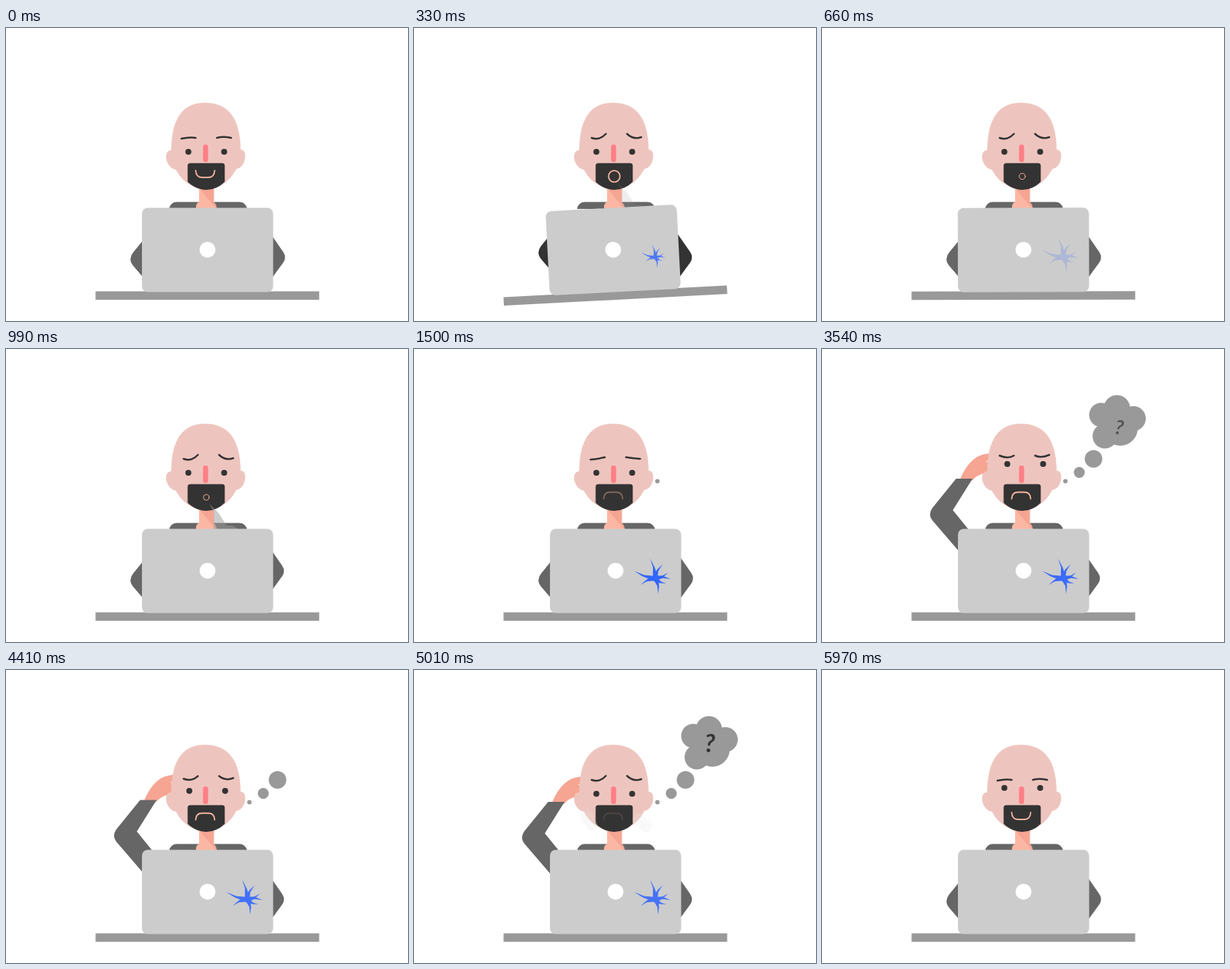
An HTML page that plays this animation: 550 px wide and 400 px high, repeating every 6600 ms.

```html
<!DOCTYPE html>
<html lang="en">
<head>
<meta charset="utf-8">
<title>Desk trouble</title>
<style>
  html, body { margin: 0; width: 100%; height: 100%; overflow: hidden; background: #fff; }
  svg { display: block; width: 100vw; height: 100vh; }
  .brow, .lip { fill: none; stroke-linecap: round; }
  .brow { stroke: #333; stroke-width: 2.5; }
  .lip { stroke: #f9b5a0; stroke-width: 1.8; }
  #mark { font: italic 700 34px Lato, sans-serif; text-anchor: middle; fill: #333; }
</style>
</head>
<body>
<svg viewBox="0 0 550 400">
  <g id="leftArm">
    <path id="hand" fill="#f6a592" d="M188 180Q196 160 207 151Q215 143 234 142V153H219Q223 152 234 157V170H221Q212 172 205 180Z"/>
    <path class="sleeve" d="M183.5 177H206L179 220L201 247V262L188 277L151 234Q144.500 226 151 217Z"/>
  </g>
  <path id="rightArm" class="sleeve" d="M351 265L379.500 306Q384 313 379.500 320L351 359Z"/>

  <path fill="#666" d="M223 247Q225 237.500 234 237.500H319Q328 237.500 330 247Z"/>
  <path fill="#f5a693" d="M264.500 216H284.500V238Q288 240 288.500 247H264.500Z"/>
  <path fill="#fcb7a4" d="M264.500 219L288 247H260V243Q260.500 239 264.500 237Z"/>

  <path fill="#eec5be" d="M227 167C219 166 217 176 221 184C224 190 229 194 234 193ZM320 166C327 165 329 174 326 182C324 189 318 193 314 192Z"/>
  <path fill="#eec5be" d="M272 102C301 102 321 119 321 168C321 195 300 220 273.500 220C247 220 226 195 226 168C226 119 245 102 272 102Z"/>
  <path fill="#333" d="M252 184.400H296Q299.300 184.400 299.300 188V210Q288 221 274 221Q260 221 248.500 210V188Q248.500 184.400 252 184.400Z"/>
  <rect x="269.500" y="159" width="7" height="24" rx="3.500" fill="#ff7f88"/>
  <g id="eyes" fill="#333"><circle cx="249.500" cy="169" r="4.100"/><circle cx="298.500" cy="169" r="4.100"/></g>
  <path id="leftBrow" class="brow"/>
  <path id="rightBrow" class="brow"/>
  <path id="mouth" class="lip"/>
  <circle id="gasp" class="lip" r="7.800"/>
  <path id="cone" fill="#999" d="M278 211L291 224L302 241H310L318 246H284V222Z"/>

  <g id="puff" fill="#e8e8e8">
    <g id="puffLeft"><circle cx="237" cy="202" r="10"/><circle cx="243" cy="212" r="8"/></g>
    <g id="puffRight"><circle cx="308" cy="205" r="9"/><circle cx="317" cy="213" r="9"/></g>
  </g>

  <g id="desk">
    <rect x="122.500" y="359.500" width="306" height="11.500" fill="#999"/>
    <rect x="186" y="245.500" width="179.500" height="115" rx="8" fill="#ccc"/>
    <circle cx="275.700" cy="302.700" r="10.800" fill="#fff"/>
  </g>
  <path id="crack" fill="#36f"/>

  <g fill="#999">
    <circle class="bubble" cx="333" cy="180.500" r="3"/>
    <circle class="bubble" cx="352" cy="168.500" r="7.500"/>
    <circle class="bubble" cx="371.500" cy="150" r="12"/>
    <g class="bubble">
      <circle cx="403.500" cy="81" r="18"/><circle cx="382" cy="90" r="16.500"/>
      <circle cx="426" cy="95" r="17"/><circle cx="387" cy="119" r="16.800"/>
      <circle cx="408" cy="108" r="24"/><circle cx="400" cy="97" r="20"/>
    </g>
  </g>
  <text id="mark">?</text>
</svg>
<script>
const LOOP = 6600, STEP = 30;
const set = (id, attrs) => {
  for (const name in attrs) document.getElementById(id).setAttribute(name, attrs[name]);
};
const ramp = (t, from, to) => Math.min(1, Math.max(0, (t - from) / (to - from)));
const ease = (t, from, to) => (1 - Math.cos(Math.PI * ramp(t, from, to))) / 2;

// Each spike is a bent sliver from the centre to its tip.
const spikeTips = [[-29, -10], [-7, -27], [10, -19], [18, -8], [21, 1], [15, 7], [4, 21], [-20, 9]];
const crackPath = spikeTips.map(([x, y], i) => {
  const length = Math.hypot(x, y), nx = -y / length, ny = x / length;
  const bend = i % 2 ? 2 : -2;
  const point = (along, side) => `${x * along + nx * side} ${y * along + ny * side}`;
  return `M${point(-0.1, -4)}L${point(0.55, bend - 1.2)}L${point(1, 0)}L${point(0.5, bend + 1.2)}L${point(-0.1, 4)}Z`;
}).join("");
set("crack", { d: crackPath });

// Brow heights (outer end, bend, inner end), brow shift, gaze x and y.
const moods = {
  calm: [151, 148.5, 150, 0, 0, 0],
  worried: [150, 154, 144.5, 3, 0, 0],
  puzzled: [152, 146, 151, 0, 0, 0],
  thinking: [145.5, 150.5, 145.5, 3, 4, -12],
  peeking: [151, 148.5, 150, 0, 0, -8]
};
const moodChanges = [
  [30, "worried"], [1410, "puzzled"], [2700, "thinking"],
  [4300, "worried"], [5100, "thinking"], [5600, "peeking"]
];
const moodAt = t => moodChanges.reduce((mood, [start, next]) => {
  const p = ease(t, start, start + 180);
  return mood.map((v, i) => v + (moods[next][i] - v) * p);
}, moods.calm);

function drawFace(t, sinceHit) {
  const [outer, bend, inner, shift, lookX, lookY] = moodAt(t);
  const left = 240 + shift, right = 288.5 + shift;
  set("leftBrow", { d: `M${left} ${outer}Q${left + 11} ${bend} ${left + 19.5} ${inner}` });
  set("rightBrow", { d: `M${right} ${inner}Q${right + 8.5} ${bend - 1} ${right + 19.5} ${outer - 1}` });
  set("eyes", { transform: `translate(${lookX} ${lookY})` });

  const frown = ramp(t, 1380, 1410) - ramp(t, 5100, 5130);
  const corner = 194.5 + 10 * frown, lip = 204 - 8.5 * frown;
  set("mouth", {
    opacity: 1 - ramp(t, 30, 150) + ramp(t, 1440, 1590) - ramp(t, 4920, 5025) + ramp(t, 5130, 5250),
    d: `M259.500 ${corner}Q260 ${lip} 268 ${lip}H277Q285 ${lip} 285.500 ${corner}`
  });

  const size = 0.3 + 0.2 * ramp(sinceHit, -240, 0) + 0.5 * ramp(sinceHit, 0, 30) - 0.7 * ramp(sinceHit, 300, 390);
  set("gasp", {
    opacity: ramp(t, 60, 180) - ramp(t, 1380, 1500),
    transform: `translate(274 202.500) scale(${size})`
  });

  const spread = 18 * (ramp(t, 4560, 5010) - 1);
  set("puff", { opacity: 0.7 * ramp(t, 4560, 4650) * (1 - ramp(t, 4700, 5150)) });
  set("puffLeft", { transform: `translate(${-spread} 0)` });
  set("puffRight", { transform: `translate(${spread} 0)` });
}

function drawArms(t, windUp, jolt) {
  const raised = ease(t, 2700, 3000) - ease(t, 5100, 5400);
  const rest = 1 - raised;
  // Scratching comes in bursts with a pause after each.
  const burst = t < 3390 ? 270 : Math.min(270, (t - 3390) % 450);
  const rub = 1.5 * (1 - Math.cos((burst - 150) / 240 * 2 * Math.PI)) * raised;
  set("leftArm", { transform: `translate(${22.5 * rest} ${90 * rest - 9 * jolt + rub})` });
  set("hand", { transform: `translate(0 ${22 * rest})` });
  set("rightArm", { transform: `translate(${-1.5 * Math.max(windUp, jolt, raised)} ${-10 * windUp})` });

  const shade = 102 - 51 * jolt;
  document.querySelectorAll(".sleeve").forEach(sleeve => {
    sleeve.style.fill = `rgb(${shade},${shade},${shade})`;
  });
}

function drawDesk(t, sinceHit, windUp) {
  const swing = sinceHit - 30;
  const tilt = swing < 0 ? 0 : -3 * Math.cos(swing / 180 * 2 * Math.PI) * Math.exp(-swing / 130);
  set("desk", { transform: `rotate(${tilt} 275.500 365)` });

  const fade = t < 690 ? ramp(t, 540, 690) : 0.13 * ramp(t, 2400, 5010) + 0.87 * ramp(t, 5010, 5400);
  set("crack", {
    opacity: ramp(sinceHit, 0, 37) * (1 - fade),
    transform: `translate(330 313) scale(${0.4 + 0.6 * ramp(sinceHit, 0, 66)})`
  });
  set("cone", { opacity: sinceHit > 0 ? 0.5 * (1 - ramp(sinceHit, 0, 45)) : 0.5 * windUp });
}

function drawThought(t) {
  const age = t >= 1500 && t < 5100 ? (t - 1500) % 1200 : -1;
  document.querySelectorAll(".bubble").forEach((shape, i) => {
    shape.style.display = age >= 180 * i ? "" : "none";
  });
  const p = ramp(age, 750, 900), q = 1 - p;
  set("mark", {
    opacity: Math.min(1, 1.1 * p),
    transform: `translate(${404 + 2 * q} ${112 + 11 * q}) rotate(${2 + 20 * q}) scale(${1 - q / 2})`
  });
}

function draw() {
  const t = Math.floor(performance.now() % LOOP / STEP) * STEP;
  const sinceHit = t - (t < 690 ? 300 : 990);
  const windUp = sinceHit > 0 ? 0 : ramp(sinceHit, -90, 0);
  const jolt = sinceHit > 0 ? 1 - ramp(sinceHit, 30, 150) : 0;
  drawFace(t, sinceHit);
  drawArms(t, windUp, jolt);
  drawDesk(t, sinceHit, windUp);
  drawThought(t);
  requestAnimationFrame(draw);
}
draw();
</script>
</body>
</html>
```
